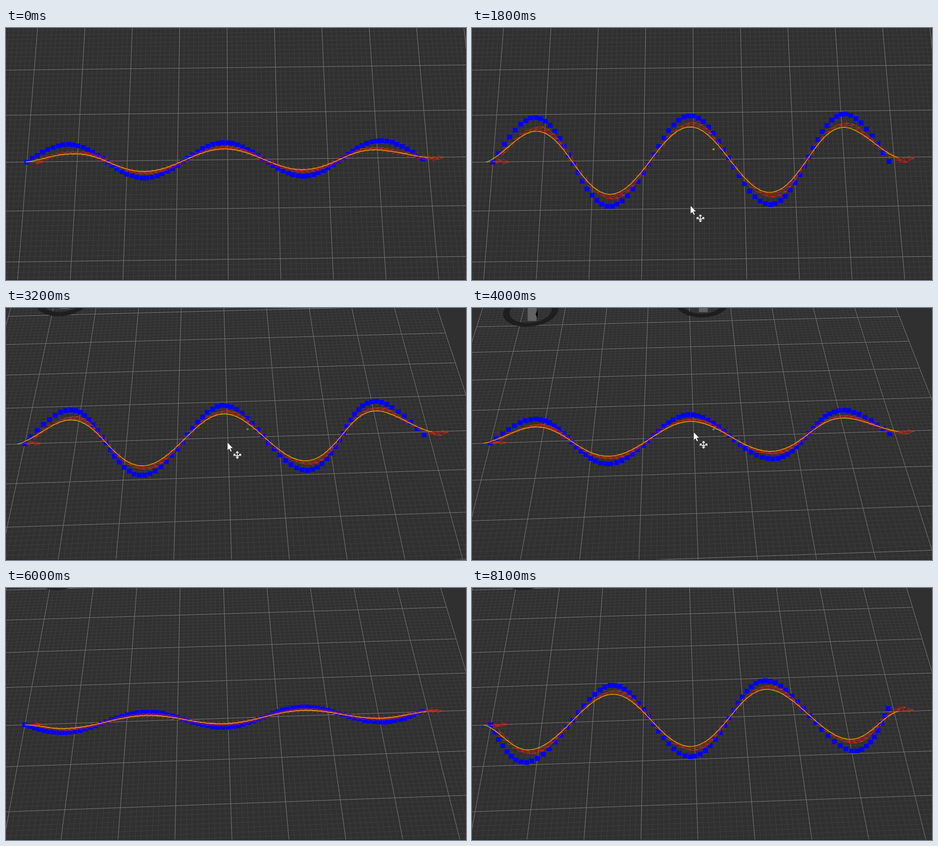
Animation, 874 px wide and 480 px high, one loop 8.2 s. Source, as an HTML page with a canvas:

```html
<!DOCTYPE html>
<html lang="en">
<head>
<meta charset="utf-8">
<title>Wave path</title>
<style>
html, body { margin: 0; width: 874px; height: 480px; overflow: hidden; background: #303030; }
canvas { display: block; }
</style>
</head>
<body>
<canvas id="stage" width="874" height="480"></canvas>
<script>
const ctx = document.getElementById('stage').getContext('2d');
const LOOP = 8200, STEP = 100;
const FOCAL = 1450, DIST = 15.29, CX = 459, CY = 231;
const FOCUS = { u: 0.4, v: -0.213 };

// time, pitch, yaw (degrees), cursor x, cursor y
const VIEWS = [
  [1800, 72.3, 0.70, 415, 338],
  [2600, 52.2, 2.15, 420, 275],
  [3800, 42.7, 2.45, 421, 236],
  [4100, 42.7, 2.45, 421, 236],
  [4900, 50.6, 2.42, 421, 262]
];
const DISCS = [[-3.82, -4.61], [0.314, -4.82]];

const clamp = (x) => Math.min(1, Math.max(0, x));
const rad = (deg) => deg * Math.PI / 180;

function viewAt(t) {
  let i = 0;
  while (i < VIEWS.length - 2 && t > VIEWS[i + 1][0]) i++;
  const a = VIEWS[i], b = VIEWS[i + 1];
  const k = clamp((t - a[0]) / (b[0] - a[0]));
  const [, pitch, yaw, x, y] = a.map((n, j) => n + (b[j] - n) * k);
  return { pitch: rad(pitch), yaw: rad(yaw), x, y };
}

// Orbit camera looking down on the ground plane
function makeProject({ pitch, yaw }) {
  const c = Math.cos(yaw), s = Math.sin(yaw);
  const sp = Math.sin(pitch), cp = Math.cos(pitch);
  return (u, v) => {
    const x = u - FOCUS.u, y = v - FOCUS.v;
    const px = c * x + s * y, py = c * y - s * x;
    const k = FOCAL / (DIST - py * cp);
    return [CX + px * k, CY + py * sp * k];
  };
}

function trace(points) {
  points.forEach(([x, y], i) => i ? ctx.lineTo(x, y) : ctx.moveTo(x, y));
}

function stroke(color, width = 1) {
  ctx.strokeStyle = color;
  ctx.lineWidth = width;
  ctx.stroke();
}

function drawGrid(project) {
  const lines = (wanted, color) => {
    ctx.beginPath();
    for (let i = -50; i <= 50; i++) {
      if ((i % 10 === 0) !== wanted) continue;
      const p = i / 10;
      trace([project(p, -5), project(p, 5)]);
      trace([project(-5, p), project(5, p)]);
    }
    stroke(color);
  };
  lines(false, '#3d3d3d');
  lines(true, '#787878');
}

function drawDiscs(project) {
  for (const [u, v] of DISCS) {
    const ring = (r) => {
      const pts = [];
      for (let a = 0; a < 48; a++) {
        const q = a * Math.PI / 24;
        pts.push(project(u + r * Math.cos(q), v + r * Math.sin(q)));
      }
      trace(pts);
      ctx.closePath();
    };
    ctx.beginPath();
    ring(0.655);
    ring(0.5);
    ctx.fillStyle = '#1e1e1e';
    ctx.fill('evenodd');
    const [x, y] = project(u, v);
    ctx.fillStyle = '#626262';
    ctx.fillRect(x - 6, y - 6, 17, 25);
    if (u < 0) {
      ctx.beginPath();
      trace([[x + 9, y + 6], [x + 13, y - 2], [x + 13, y + 14]]);
      ctx.fillStyle = '#050505';
      ctx.fill();
    }
  }
}

const amplitude = (t) => 0.98 * Math.sin(0.5 * (5.53 - t / 1000));

// Smoothed curve following the wave with eased ends
function makePath(t) {
  const amp = amplitude(t), size = Math.abs(amp);
  const ext = clamp((size - 0.3) / 0.3);
  const from = -4 - 0.14 * ext, to = 3.97 + 0.11 * ext;
  const gain = amp * (0.55 + 0.2 * size);
  const edge = 0.92 - 0.25 * Math.exp(-t / 600);
  const at = (u) => {
    let x = u + 4;
    if (u < -3.2) x = 0.8 * Math.pow(Math.max(0, (u - from) / (-3.2 - from)), 1.4);
    if (u > 3.05) x = 7.854 - 0.804 * Math.pow(Math.max(0, (to - u) / (to - 3.05)), 1.4);
    const inner = Math.min(u - from, to - u);
    return -gain * Math.sin(2 * x) * (edge + (1 - edge) * clamp((inner - 0.8) / 0.8));
  };
  return { from, to, at };
}

function drawPoints(project, t) {
  const amp = amplitude(t);
  ctx.fillStyle = '#0000ff';
  for (let i = 0; i < 80; i++) {
    const [x, y] = project(-4 + i / 10, -amp * Math.sin(i / 5));
    ctx.fillRect(Math.round(x - 4.5), Math.round(y - 4.5), 9, 9);
  }
}

function drawArrow(project, u, v, angle) {
  const c = Math.cos(angle), s = Math.sin(angle);
  const local = (x, y) => project(u + x * c - y * s, v + x * s + y * c);
  const tip = local(0.32, 0);
  trace([local(0, 0), tip]);
  trace([local(0.2, -0.05), tip, local(0.2, 0.05)]);
}

function drawPath(project, { from, to, at }) {
  ctx.beginPath();
  const count = 80;
  for (let i = 0; i <= count; i++) {
    const u = from + (to - from) * i / count;
    const slope = (at(u + 0.02) - at(u - 0.02)) / 0.04;
    drawArrow(project, u, at(u), Math.atan(slope));
  }
  drawArrow(project, -4, 0, 0);
  stroke('#f02408', 0.9);

  const pts = [];
  for (let i = 0; i <= 200; i++) {
    const u = from + (to - from) * i / 200;
    pts.push(project(u, at(u)));
  }
  ctx.beginPath();
  trace(pts);
  stroke('#c8d000', 1.1);
}

function drawCursor({ x, y }) {
  ctx.save();
  ctx.translate(x, y);
  ctx.beginPath();
  trace([[0, 0], [0, 16], [3.6, 12.8], [6.2, 18.5], [8.8, 17.3], [6.3, 11.8], [11, 11.5]]);
  ctx.closePath();
  ctx.fillStyle = '#fff';
  ctx.fill();
  stroke('#222', 0.8);

  ctx.translate(19, 24);
  ctx.beginPath();
  trace([[0, -6], [0, 7]]);
  trace([[-2.5, -3.5], [0, -6], [2.5, -3.5]]);
  trace([[-2.5, 4.5], [0, 7], [2.5, 4.5]]);
  ctx.moveTo(-6.5, -1);
  ctx.quadraticCurveTo(0, 6, 6.5, -1);
  trace([[-6.5, 2.5], [-6.5, -1], [-3.5, -1]]);
  trace([[6.5, 2.5], [6.5, -1], [3.5, -1]]);
  stroke('#fff', 1.4);
  ctx.restore();
}

function drawFocus(t) {
  ctx.beginPath();
  ctx.ellipse(CX, CY, 2.3, 2, 0, 0, Math.PI * 2);
  ctx.fillStyle = t < 2200 ? '#a8921a' : '#7c7c24';
  ctx.fill();
}

function draw(t) {
  const view = viewAt(t);
  const project = makeProject(view);
  ctx.fillStyle = '#303030';
  ctx.fillRect(0, 0, 874, 480);
  drawGrid(project);
  drawDiscs(project);
  drawPoints(project, t);
  drawPath(project, makePath(t));
  if (t >= 1800 && t < 5400) drawFocus(t);
  if (t >= 1500 && t < 5500) drawCursor(view);
  ctx.fillStyle = '#2b2326';
  ctx.fillRect(0, 479, 874, 1);
}

const start = performance.now();
let shown = -1;
function tick() {
  const now = (performance.now() - start) % LOOP;
  const t = now < 200 ? 0 : Math.floor(now / STEP) * STEP;
  if (t !== shown) draw(shown = t);
  requestAnimationFrame(tick);
}
tick();
</script>
</body>
</html>
```
